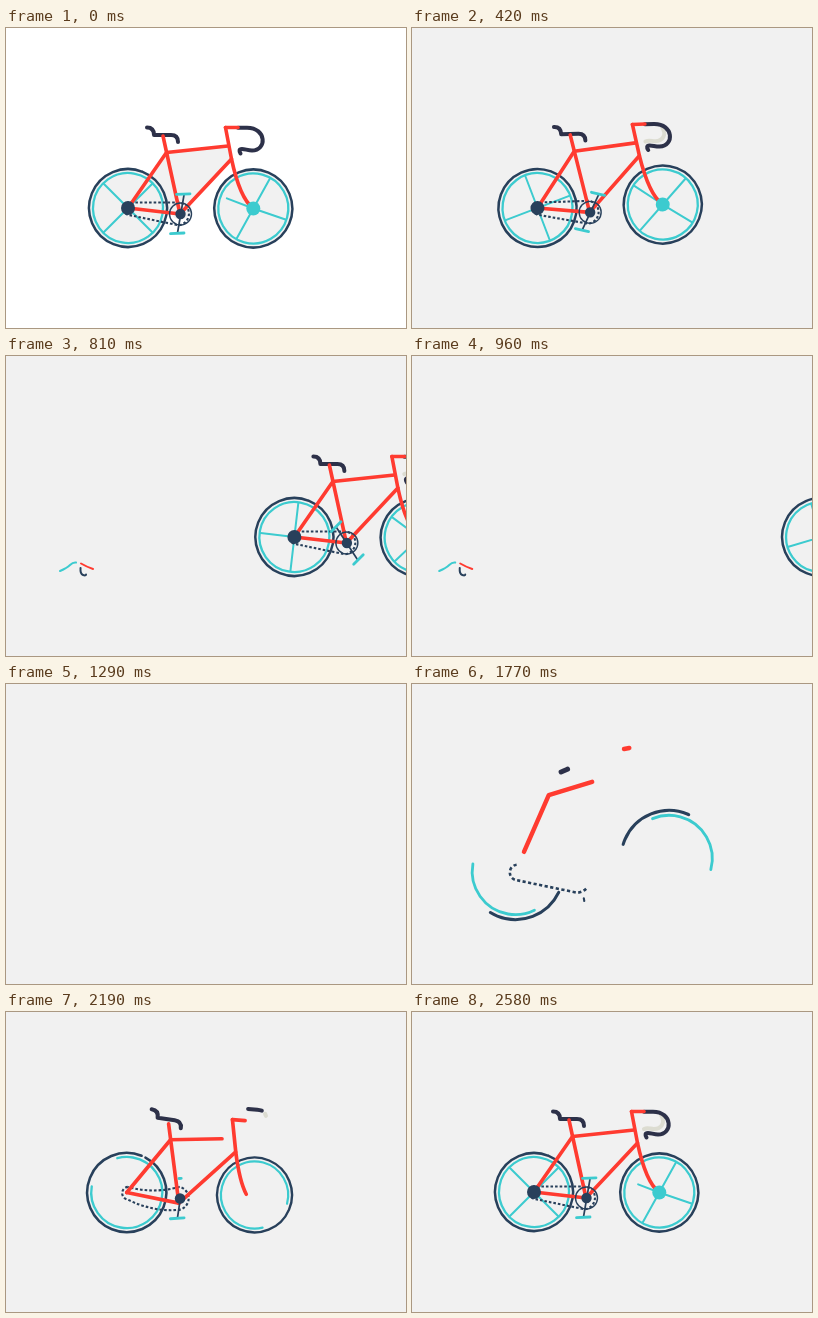
Write an HTML page that moves like this. It is 400 by 300 pixels and loops after 2610 ms.

```html
<!DOCTYPE html>
<html lang="en">
<head>
<meta charset="utf-8">
<title>Bicycle</title>
<style>
  html, body { margin: 0; width: 100%; height: 100%; overflow: hidden; background: #f1f1f1; }
  svg { display: block; width: 100vw; height: 100vh; }
  path { fill: none; stroke-linecap: round; stroke-linejoin: round; }
</style>
</head>
<body>
<svg id="stage" viewBox="0 0 400 300"></svg>
<script>
const LOOP = 2610, STEP = 30, BUILD = 1320, DONE = 1e4;
const RED = '#ff3b30', NAVY = '#28405b', INK = '#2d3149', CYAN = '#3ccbcf', PALE = '#f1f1f1', SHADE = '#dcdcd1';
const stage = document.getElementById('stage');

function add(parent, tag, attrs = {}) {
  const el = document.createElementNS('http://www.w3.org/2000/svg', tag);
  for (const k in attrs) el.setAttribute(k, attrs[k]);
  parent.appendChild(el);
  return el;
}
const group = parent => add(parent, 'g');
const move = (el, value) => el.setAttribute('transform', value);
const show = (el, on) => el.setAttribute('visibility', on ? 'inherit' : 'hidden');

// Progress from 0 to 1 between two times, and a rise and fall over the same span
const part = (t, from, to) => Math.min(1, Math.max(0, (t - from) / (to - from)));
const hump = (t, from, to) => Math.sin(Math.PI * part(t, from, to));

// A line grows out of a seed point; its two ends arrive at their own times
const span = (t, seed, from, tail, head = tail) =>
  [seed * (1 - part(t, from, tail)), seed + (1 - seed) * part(t, from, head)];

const lines = [];
function grow(parent, d, color, width, ...timing) {
  const el = add(parent, 'path', { d, stroke: color, 'stroke-width': width, pathLength: 100 });
  lines.push({ el, timing });
  return el;
}
function trim({ el, timing }, t) {
  const [a, b] = span(t, ...timing);
  show(el, b - a > 0.005);
  if (b - a > 0.999) el.removeAttribute('stroke-dasharray');
  else {
    el.setAttribute('stroke-dasharray', `${(b - a) * 100} 1000`);
    el.setAttribute('stroke-dashoffset', -a * 100);
  }
}

function rim(parent, r, angle, color, width, ...timing) {
  const d = `M${r} 0A${r} ${r} 0 0 1 ${-r} 0A${r} ${r} 0 0 1 ${r} 0`;
  move(grow(parent, d, color, width, ...timing), `rotate(${angle})`);
}
function spoke(parent, angle, from, ...timing) {
  move(grow(parent, `M${from} 0H34`, CYAN, 2, ...timing), `rotate(${angle})`);
}

const dots = [];
function dot(parent, x, y, r, color, from) {
  dots.push({ el: add(parent, 'circle', { cx: x, cy: y, fill: color }), r, from });
}

const bg = add(stage, 'rect', { width: 400, height: 300 });
const bike = group(stage);
const fills = group(bike);
for (const [x, r] of [[122, 39], [247.5, 39], [174.5, 11]])
  add(fills, 'circle', { cx: x, cy: 180.5, r, fill: PALE });
add(fills, 'polygon', { points: '122,180 160.5,124.5 222,118 225.5,131 174,186', fill: PALE });

const rear = group(bike), front = group(bike);
const rearSpin = group(rear), frontSpin = group(front);
const drive = group(bike), frame = group(bike);
const seat = group(frame), bar = group(frame);
const over = group(bike), crank = group(over);
const frontHub = group(bike);

// Wheels
rim(rear, 39, -68, NAVY, 2.5, 0.33, 1650, 2220, 2060);
rim(rear, 35, -170, CYAN, 2.3, 1, 1457, 2350);
rim(front, 39, 113, NAVY, 2.5, 0.35, 1650, 2010, 2160);
rim(front, 35, 15, CYAN, 2.3, 1, 1457, 2340);
spoke(rearSpin, 45, -34, 0.5, 2250, 2550);
spoke(rearSpin, -45, -34, 0.5, 2250, 2550);
spoke(frontSpin, -61, -34, 0.5, 2250, 2550);
spoke(frontSpin, 19, 0, 0, 2280, 2550);
spoke(frontSpin, 201, 0, 0, 2460, 2640);

// Chain
const chain = add(drive, 'path', { stroke: NAVY, 'stroke-width': 2.1, style: 'stroke-linecap:butt' });
function drawChain(t, sag) {
  const [a, b] = span(t, 0.1, 1500, 1770, 2140), len = 163;
  show(chain, b - a > 0.01);
  chain.setAttribute('d', 'M123 174.5A6.3 6.3 0 0 0 123 187' +
    `Q147 ${192 + sag} 172 197.2A11.5 11.5 0 0 0 174 174.5Q148 ${174.5 + sag} 123 174.5`);
  const n = Math.max(1, Math.round((b - a) * len / 4.6));
  chain.setAttribute('stroke-dasharray', `0 ${a * len} ` + '2.6 2 '.repeat(n) + '0 999');
}

// Frame, seat and handlebar
grow(frame, 'M157 108L174 186', RED, 3.6, 0.5, 1800, 2200, 2150);
grow(frame, 'M122 180L174 186', RED, 3.6, 0.5, 1830, 2130);
grow(frame, 'M225.5 131L174 186', RED, 3.6, 0.5, 1800, 2130);
grow(frame, 'M122 180L160.5 124.5L222 118', RED, 3.6, 0.7, 1350, 1870, 2530);
grow(frame, 'M219.5 99.5L225.5 131C230 152 236 172 247 180', RED, 3.6, 0.4, 1800, 2150, 2300);
grow(frame, 'M219.5 99.5H232', RED, 3.6, 1, 1560, 2160);
grow(seat, 'M141 99.5C146 99.5 148 102 148 107H165C170 107 172 110 172 114', INK, 4, 0.69, 1710, 2130);
const shade = grow(bar, 'M249 103C254 111 249 117 242 117C238 117 236 115 232 117', SHADE, 4, 0, 2160, 2580);
grow(bar, 'M232 99.7H241C261 100 261 122.5 246 122.5C242 122.5 239 121 236 121C233 121 233 123 234.5 125.5',
  INK, 4, 0, 2100, 2530);

// Chainring, crank, pedals and hubs
const ring = add(over, 'circle', { cx: 174.5, cy: 186, r: 11, fill: 'none', stroke: NAVY, 'stroke-width': 1.4 });
grow(crank, 'M178 167L171.5 205', NAVY, 1.7, 0.95, 1740, 2550, 1800);
grow(crank, 'M170.5 166.3L184 165.8', CYAN, 2.8, 0.3, 2130, 2500);
grow(crank, 'M164.5 205.6L178 205', CYAN, 2.8, 0.5, 1920, 2160);
dot(over, 174.5, 186, 5.2, NAVY, 1980);
dot(over, 122, 180, 7, NAVY, 2220);
dot(frontHub, 0, 0, 7, CYAN, 2250);

// Scraps thrown back by the rear wheel
const dust = group(stage);
add(dust, 'path', { d: 'M-17 8Q-10 5 -7 2T-1 -0.5', stroke: CYAN, 'stroke-width': 2 });
add(dust, 'path', { d: 'M4 0.5Q10 4 16 6', stroke: RED, 'stroke-width': 2 });
add(dust, 'path', { d: 'M3.5 5Q3 11 6 12T9 11.5', stroke: NAVY, 'stroke-width': 2 });

// The bike speeds off to the right, front wheel lifted at first
function ride(t) {
  const u = t < BUILD ? Math.max(0, t - 390) : 0;
  const x = 122 + 0.095 * u + 0.000717 * u * u;
  const y = 180 + (u && part(t, 600, 810));
  move(bike, `translate(${x} ${y}) rotate(${-7 * hump(t, 390, 750)}) translate(-122 -180)`);
  move(rearSpin, `rotate(${1.54 * u ** 0.83})`);
  move(frontSpin, `rotate(${0.47 * u})`);
  return 1.16 * u ** 0.79;
}

// Parts start spread out and large, draw together, then rock once
function assemble(t, pedal) {
  const apart = 1 - part(t, 1350, 2220), rock = hump(t, 2000, 2400);
  const size = 1 + 0.45 * apart;
  const base = `translate(${122 - 36 * apart} ${180 + 14.5 * apart}) scale(${size})`;
  const wheel = `translate(${247.3 + 19 * apart + 0.6 * rock} ${180.5 - 11.6 * apart + 2.9 * rock}) ` +
    `scale(${size - 0.055 * rock})`;
  const toRest = ' translate(-122 -180)';
  move(rear, base);
  move(front, wheel);
  move(frontHub, wheel);
  move(drive, base + toRest);
  move(over, base + toRest);
  move(frame, `${base} rotate(${5.7 * rock - 21.5 * apart})${toRest}`);
  move(seat, `translate(${27 * apart - 3 * rock} ${-2 * rock}) rotate(${4 * rock - 25 * apart} 164 107)`);
  move(bar, `translate(${2 * rock} ${-12 * rock})`);
  move(crank, `rotate(${pedal - 38 * apart} 174.5 186)`);

  lines.forEach(line => trim(line, t));
  for (const { el, r, from } of dots) el.setAttribute('r', r * part(t, from, from + 180));
  ring.setAttribute('opacity', part(t, 2250, 2400));
  drawChain(t, 7 * rock);
}

function blow(t) {
  const v = t - 420, size = part(t, 420, 540);
  show(dust, size > 0 && t < 1290);
  move(dust, `translate(${117 - 0.074 * v - 0.0001125 * v * v} ${217 - 10 * size}) scale(${size})`);
}

function draw(now) {
  const t = Math.floor(now % LOOP / STEP) * STEP;
  // The last lines are still arriving as the loop begins again
  const build = t < 120 ? t + LOOP : t < BUILD ? DONE : t;
  const opening = t < 60;
  bg.setAttribute('fill', opening ? '#fff' : PALE);
  show(fills, opening);
  assemble(build, ride(t));
  if (opening) show(shade, false);
  blow(t);
}

const start = performance.now();
function tick() {
  draw(performance.now() - start);
  requestAnimationFrame(tick);
}
tick();
</script>
</body>
</html>
```
